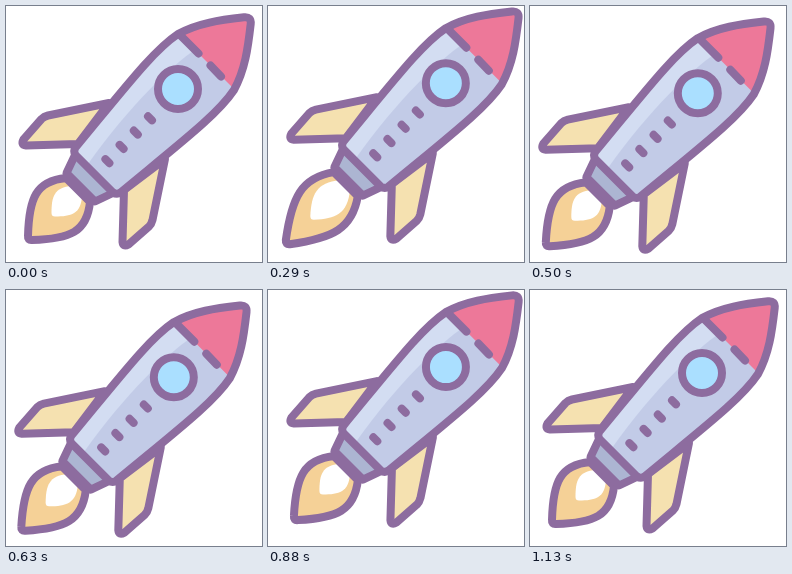
Write an HTML page that moves like this. It is 256 by 256 pixels and loops after 1180 ms.

```html
<!DOCTYPE html>
<html lang="en">
<head>
<meta charset="utf-8">
<title>Rocket</title>
<style>
  html, body { margin: 0; width: 100%; height: 100%; overflow: hidden; background: #fff; }
  svg { display: block; width: 100vw; height: 100vh; }
  .line { stroke: #8d6c9f; stroke-width: 8; stroke-linecap: round; stroke-linejoin: round; }
</style>
</head>
<body>
<svg viewBox="0 0 256 256">
  <defs>
    <path id="fin" d="M103 97L42 109.500Q38 110.500 35.500 113L17.500 133.500Q14.500 139 20 139.500L72 138Z"/>
    <path id="hull" d="M238 11.300C214 14 192 17 172 28C148 44 122 78 69.500 141.500Q67 145 69.500 149L107 186.500Q111 189 114.500 186.500C178 134 212 108 228 84C239 64 242 42 244.700 18Q245.500 10.500 238 11.300Z"/>
    <clipPath id="inside"><use href="#hull"/></clipPath>
  </defs>
  <g id="rocket">
    <path id="flame" fill="#f5d197"/>
    <path id="core" fill="#fff"/>
    <path id="rim" class="line" fill="none"/>
    <use href="#fin" class="line" fill="#f5e1b0"/>
    <use href="#fin" class="line" fill="#f5e1b0" transform="matrix(0 -1 -1 0 256 256)"/>
    <path class="line" fill="#acb5d2" d="M70 147L60.500 167L89 195.500L109 186Z"/>
    <g clip-path="url(#inside)">
      <path fill="#c2cbe7" d="M0 0H256V256H0Z"/>
      <path fill="#d3ddf2" d="M190 43C165 60 125 98 82 158L40 140L170 20Z"/>
      <path fill="#ed7899" d="M150 5L245 100L256 0Z"/>
    </g>
    <use href="#hull" class="line" fill="none"/>
    <path class="line" fill="none" d="M175 30L192.500 47.500M204.500 59.500L215 70.500"/>
    <circle class="line" cx="172" cy="83" r="20" fill="#aadfff"/>
    <path id="vents" class="line" fill="none"/>
  </g>
</svg>
<script>
  const $ = id => document.getElementById(id);
  const LOOP = 1180, FPS = 24, LAST = 27;

  // [step, value] tables
  const drift = [[0, 0], [3, 3.3], [6.75, 6], [10.1, 0], [13.5, -6], [17, 0.2], [20.25, 6], [23.6, 3], [27, 0]];
  const length = [[0, 0], [3, 8], [5, 10.5], [7, 10], [12, 2], [14, 1.5], [17, 4.5], [21, 2], [27, 0]];
  const heat = [[0, 0], [3, 12], [5, 12], [7, 9], [12, 0], [17, 3], [21, 0], [27, 0]];

  // smooth curve through a table
  function track(keys, x) {
    let i = 0;
    while (i < keys.length - 2 && x >= keys[i + 1][0]) i++;
    const slope = k => {
      const a = keys[k - 1], b = keys[k + 1];
      return a && b ? (b[1] - a[1]) / (b[0] - a[0]) : 0;
    };
    const [x0, y0] = keys[i], [x1, y1] = keys[i + 1];
    const w = x1 - x0, u = (x - x0) / w, v = 1 - u;
    return v * v * (1 + 2 * u) * y0 + u * u * (3 - 2 * u) * y1
      + u * v * w * (v * slope(i) - u * slope(i + 1));
  }

  // drop shape: one side given, the other mirrored across the rocket's axis
  const flip = ([x, y]) => [256 - y, 256 - x];
  function drop(base, c1, c2, end, tip) {
    return `M${base}C${c1} ${c2} ${end}Q${tip} ${flip(end)}C${flip(c2)} ${flip(c1)} ${flip(base)}Z`;
  }

  const flamePath = e => drop(
    [60, 172],
    [30 - e * 0.25, 175 + e * 0.25],
    [23 - e * 0.5, 192 + e * 0.5],
    [22 - e, 230 + e],
    [21.5 - e, 234.5 + e]);

  const corePath = e => drop(
    [66, 180],
    [48 - e * 0.6, 181 + e * 0.1],
    [45.5 - e * 0.9, 191 + e * 0.4],
    [45.5 - e, 207 + e],
    [45.5 - e, 210.5 + e]);

  $("vents").setAttribute("d", [0, 1, 2, 3]
    .map(k => `M${142 - 14.2 * k} ${110.3 + 14.3 * k}l4 4`).join(""));

  function draw(now) {
    const t = Math.floor((now % LOOP) / 10) * 10;
    const step = Math.min(LAST, Math.floor((t + 4.9) * FPS / 1000));
    const d = track(drift, step);
    const flame = flamePath(track(length, step));
    $("rocket").setAttribute("transform", `translate(${d} ${-d})`);
    $("flame").setAttribute("d", flame);
    $("rim").setAttribute("d", flame);
    $("core").setAttribute("d", corePath(track(heat, step)));
  }

  const start = performance.now();
  function tick() {
    draw(performance.now() - start);
    requestAnimationFrame(tick);
  }
  tick();
</script>
</body>
</html>
```
